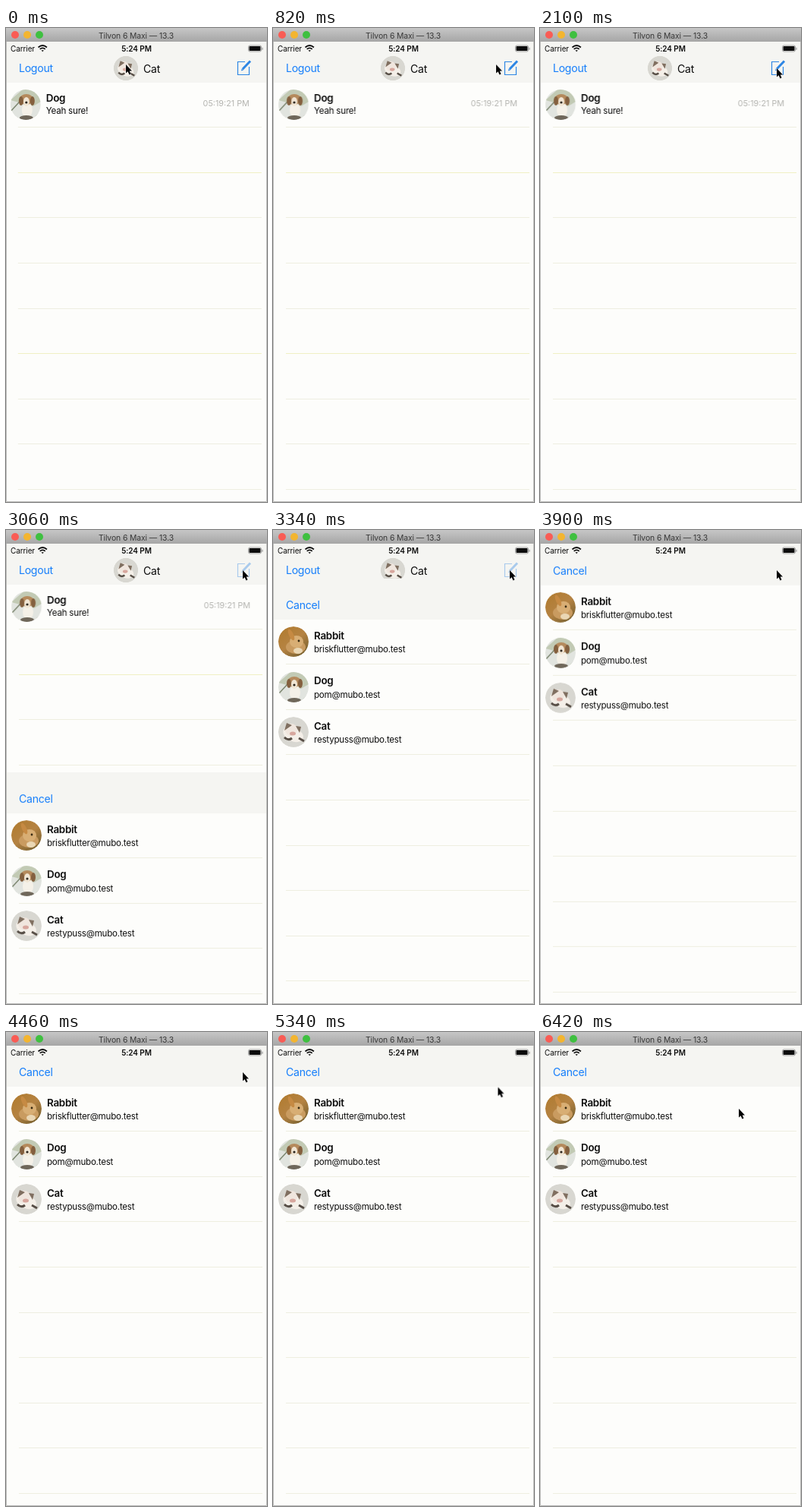
These frames come from a looping animation (344x624 px, 8000 ms). An HTML page:

```html
<!DOCTYPE html>
<html lang="en">
<head>
<meta charset="utf-8">
<title>Chat list</title>
<style>
  html, body { margin: 0; width: 100%; height: 100%; overflow: hidden; background: #fdfdfb; }
  svg { display: block; width: 344px; height: 624px; }
  text { font-family: Inter, Roboto, sans-serif; font-size: 11.6px; letter-spacing: -.02em; fill: #0c0c0c; }
  .title { font-size: 10.4px; letter-spacing: -.01em; fill: #383838; }
  .status { font-size: 10px; letter-spacing: -.01em; }
  .bar { font-size: 14.1px; }
  .link { fill: #157efb; }
  .name { font-size: 13.4px; font-weight: 600; }
  .stamp { font-size: 10.8px; letter-spacing: 0; fill: #b4b4b0; }
  .page { fill: #fdfdfb; }
  .head { fill: #f5f5f2; }

  .rows, .icon, .sheet, .cursor { animation: 8s linear infinite; }
  .rows { animation-name: settle; }
  .icon { animation-name: press; }
  .sheet { animation-name: rise; }
  .cursor { animation-name: point; }

  @keyframes settle {
    0% { transform: translateX(-1.2px); }
    5%, 100% { transform: none; }
  }
  @keyframes press {
    0%, 29.25% { opacity: 1; }
    31.25%, 100% { opacity: .38; }
  }
  @keyframes rise {
    0% { transform: translateY(606px); }
    33.5% { transform: translateY(606px); animation-timing-function: cubic-bezier(.5, .1, .4, 1); }
    44% { transform: translateY(18px); }
    45.25% { transform: translateY(18px); animation-timing-function: ease-out; }
    49.5%, 100% { transform: none; }
  }
  @keyframes point {
    0% { transform: translate(158px, 48px); animation-timing-function: ease-in-out; }
    10.25% { transform: translate(294px, 48px); }
    15% { transform: translate(304px, 51px); }
    19.5%, 20.5% { transform: translate(311px, 57px); }
    26.25%, 57% { transform: translate(312px, 53px); }
    64.5% { transform: translate(306px, 65px); }
    73.75%, 75% { transform: translate(267px, 96px); }
    77%, 78.5% { transform: translate(263px, 101px); }
    80.25%, 100% { transform: translate(262px, 101px); }
  }
</style>
</head>
<body>
<svg viewBox="0 0 344 624">
  <defs>
    <linearGradient id="chrome" x2="0" y2="1">
      <stop stop-color="#c6c6c6"/><stop offset="1" stop-color="#a6a6a6"/>
    </linearGradient>
    <linearGradient id="gold" x2=".8" y2="1">
      <stop stop-color="#b07a2c"/><stop offset=".55" stop-color="#b58343"/><stop offset="1" stop-color="#76602f"/>
    </linearGradient>
    <clipPath id="round"><circle r="20"/></clipPath>

    <path id="lines" stroke="#eeeee0" d="M17 130.5h321M17 190.5h321M17 249.5h321M17 309.5h321M17 369.5h321M17 428.5h321M17 488.5h321M17 547.5h321M17 607.5h321"/>

    <g id="dog" clip-path="url(#round)">
      <circle r="20" fill="#e1e4df"/>
      <path d="M-20 -6L-4 -20H20V-4L10 2Z" fill="#c2cab4"/>
      <path d="M-19 8L-7 -5" stroke="#7c8670" stroke-width="1.5"/>
      <path d="M8 20L20 8V20Z" fill="#b9bfae"/>
      <ellipse cx="2" cy="7" rx="7" ry="10" fill="#f5f1e8"/>
      <ellipse cx="1" cy="17" rx="9" ry="3" fill="#6f675a"/>
      <ellipse cx="1" cy="-7" rx="9" ry="7" fill="#b58a5c"/>
      <ellipse cx="1" cy="-4" rx="4" ry="6" fill="#f1e6d4"/>
      <ellipse cx="-6" cy="-5" rx="3" ry="6" fill="#84603f"/>
      <ellipse cx="9" cy="-5" rx="3" ry="6" fill="#84603f"/>
      <circle cx="1" cy="-3" r="1.6" fill="#2a241c"/>
    </g>
    <g id="cat" clip-path="url(#round)">
      <circle r="20" fill="#d8d7d1"/>
      <ellipse cx="1" cy="3" rx="14" ry="9" fill="#f4efe8" transform="rotate(25)"/>
      <circle cx="-3" cy="-3" r="8" fill="#f0e6de"/>
      <path d="M-12 -2L-9 -12L-2 -9ZM3 -8L10 -7L8 1Z" fill="#806f60"/>
      <path d="M-12 7q5 5 10 1M7 8l7 4" stroke="#574e46" stroke-width="3" fill="none"/>
      <ellipse cx="-1" cy="2" rx="4" ry="2.5" fill="#d7a69d"/>
    </g>
    <g id="rabbit" clip-path="url(#round)">
      <circle r="20" fill="url(#gold)"/>
      <ellipse cx="3" cy="7" rx="13" ry="9" fill="#c99b60"/>
      <ellipse cx="4" cy="0" rx="9" ry="8" fill="#d8ae74"/>
      <ellipse cx="-3" cy="-9" rx="3" ry="8" fill="#c68a43" transform="rotate(-25 -3 -9)"/>
      <ellipse cx="6" cy="12" rx="6" ry="4" fill="#ead7b4"/>
      <circle cx="7" cy="-1" r="1.4" fill="#33260f"/>
    </g>
  </defs>

  <rect class="page" width="344" height="624"/>
  <rect class="head" y="18" width="344" height="54"/>
  <text class="bar link" x="17" y="58">Logout</text>
  <use href="#cat" transform="translate(158 53) scale(.81)"/>
  <text class="bar" x="181" y="58.5">Cat</text>
  <g class="icon" fill="none" stroke="#2d86e4">
    <path d="M315 44.5H305.5V61.5H320.5V51" stroke-width="1.2"/>
    <path d="M312 54L322 43.5" stroke-width="3"/>
    <path d="M310.5 56l.8-2.5 1.5 1.5z"/>
  </g>

  <g class="rows">
    <use href="#lines"/>
    <path d="M17 190.5h321M17 428.5h321" stroke="#f0f0c4"/>
    <use href="#dog" x="27" y="101"/>
    <text class="name" x="54" y="97">Dog</text>
    <text x="54" y="113">Yeah sure!</text>
    <text class="stamp" x="322" y="102.5" text-anchor="end">05:19:21 PM</text>
  </g>

  <g class="sheet">
    <rect class="page" y="18" width="344" height="606"/>
    <rect class="head" y="18" width="344" height="54"/>
    <text class="bar link" x="17" y="58">Cancel</text>
    <use href="#lines"/>
    <use href="#rabbit" x="27" y="101"/>
    <text class="name" x="54" y="97.5">Rabbit</text>
    <text x="54" y="115">briskflutter@mubo.test</text>
    <use href="#dog" x="27" y="161"/>
    <text class="name" x="54" y="157">Dog</text>
    <text x="54" y="174.5">pom@mubo.test</text>
    <use href="#cat" x="27" y="220"/>
    <text class="name" x="54" y="216.5">Cat</text>
    <text x="54" y="234">restypuss@mubo.test</text>
  </g>

  <text class="status" x="6" y="30.5">Carrier</text>
  <g fill="none" stroke="#0c0c0c" stroke-width="1.7">
    <path d="M42.5 25.5q5.7-5 11.4 0M44.7 27.8q3.5-3 7 0"/>
    <path d="M46.5 29.3h3.4l-1.7 1.9z" fill="#0c0c0c" stroke="none"/>
  </g>
  <text class="status" x="172" y="30.5" text-anchor="middle" font-weight="600">5:24 PM</text>
  <rect x="319.5" y="23" width="17" height="8" rx="2" fill="none" stroke="#8c8c8c" stroke-width=".8"/>
  <rect x="320.5" y="24" width="15" height="6" rx="1" fill="#0c0c0c"/>
  <path d="M338 25.8v3" stroke="#8c8c8c"/>

  <path d="M.5 18V623.5H343.5V18" fill="none" stroke="#bcbcba"/>
  <rect width="344" height="18" fill="url(#chrome)"/>
  <circle cx="12" cy="9" r="5" fill="#f95c55"/>
  <circle cx="28" cy="9" r="5" fill="#f3b530"/>
  <circle cx="44" cy="9" r="5" fill="#3fc040"/>
  <text class="title" x="171.5" y="13.5" text-anchor="middle">Tilvon 6 Maxi — 13.3</text>

  <path class="cursor" d="M0 0V11.5L2.6 9.2L4.5 13.5L6.5 12.6L4.7 8.5H8Z" fill="#000" stroke="#fff" stroke-width=".8" paint-order="stroke"/>
</svg>
</body>
</html>
```
